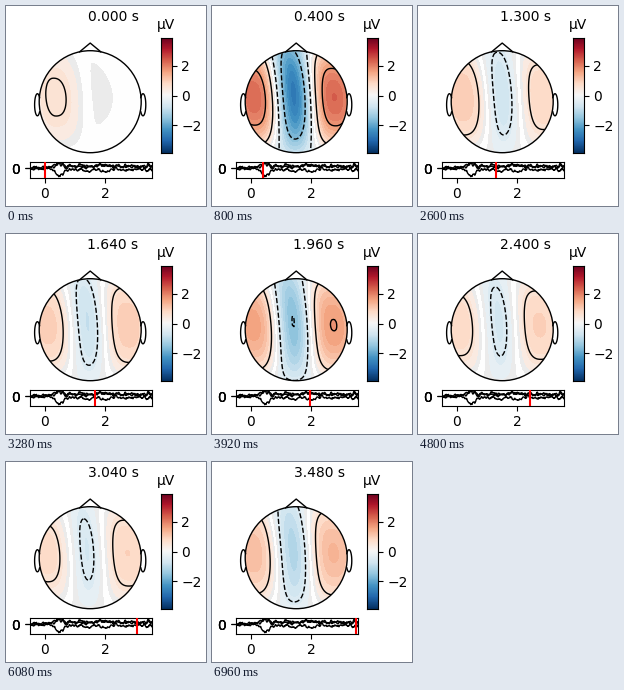
A matplotlib script for the animation above (7 s loop, 200x200 px).

```python
import numpy as np
import matplotlib.pyplot as plt
from matplotlib.animation import FuncAnimation
from matplotlib.patches import Circle

SIZE, FRAMES, STEP = 200, 175, 0.02
CX, CY, R = 84.2, 95.7, 51
VMAX = 3.85

plt.rcParams.update({"font.family": "DejaVu Sans", "font.size": 10})
fig = plt.figure(figsize=(2, 2), dpi=100, facecolor="white")


def axes_px(left, top, right, bottom):
    return fig.add_axes([left / SIZE, 1 - bottom / SIZE,
                         (right - left) / SIZE, (bottom - top) / SIZE])


def bump(t, centre, width, height):
    return height * np.exp(-((t - centre) / width) ** 2)


def potentials(t):
    """Left, centre and right potentials in microvolts."""
    drive = .12 + .55 / (1 + np.exp((.25 - t) / .05))
    drive += bump(t, .47, .14, 2.7) + bump(t, 1.3, .2, .15)
    drive += bump(t, 1.96, .25, .99) + bump(t, 3.5, .2, .5)
    side = 3 * np.tanh((.15 + drive) / 3)
    lateral = bump(t, 0, .25, .8) + bump(t, 1.3, .25, .3) - .1
    return side + lateral / 2, -drive, side - lateral / 2


grid = np.linspace(-1.05, 1.05, 72)
U, V = np.meshgrid(grid, grid)
PX, PY = CX + R * U, CY + R * V


def field(t):
    left, mid, right = potentials(t)
    u0 = -.03 + .2 * (left - right) + .06 * V - .05 * V ** 2
    d = (U - u0) / .8
    a = np.abs(d)
    s = 1 - ((1 + np.cos(np.pi * np.minimum(a, 1))) / 2) ** 1.35
    side = np.where(d < 0, left, right) * (1 - .85 * (V + .09) ** 2)
    side = side * (1 - 2.5 * np.maximum(a - 1, 0) ** 2)
    centre = mid * (1 - .5 * (V + .16) ** 2)
    return centre + (side - centre) * s


# Head map
head = axes_px(0, 0, SIZE, SIZE)
head.set(xlim=(0, SIZE), ylim=(SIZE, 0))
head.axis("off")
skull = head.add_patch(Circle((CX, CY), R, fill=False, lw=1, zorder=5))
dx, dy = np.sin(np.radians(12)), np.cos(np.radians(12))
head.plot(CX + R * np.array([-dx, 0, dx]), CY - R * np.array([dy, 1.15, dy]), "k", lw=1)
angle = np.radians(np.linspace(140, -140, 30))
ear_x = R * (1.035 + .055 * np.cos(angle))
ear_y = CY + R * (.06 - .217 * np.sin(angle))
for sign in (-1, 1):
    head.plot(CX + sign * ear_x, ear_y, "k", lw=1)
clock = head.text(132.5, 15.3, "", ha="right", va="baseline")

# Flat colour bands, nearly white around zero
cmap = plt.get_cmap("RdBu_r")
edges = np.r_[.1, np.arange(.25, 4.4, .2)]
bands = np.r_[-edges[::-1], edges]
middles = (bands[1:] + bands[:-1]) / 2
shades = [cmap(.5 + v / (2 * VMAX)) for v in middles]
zero = len(shades) // 2
shades[zero - 1:zero + 2] = ["#ebebeb", "#fefefe", "#ebebeb"]
lines = np.linspace(-VMAX, VMAX, 7, endpoint=False)[1:]

# Colour bar
bar = axes_px(154.8, 31.8, 165.7, 147.2)
bar.imshow(np.linspace(0, 1, 256)[:, None], cmap=cmap, aspect="auto",
           origin="lower", extent=(0, 1, -VMAX, VMAX))
bar.set_xticks([])
bar.set_yticks([-2, 0, 2], ["\u22122", "0", "2"])
bar.yaxis.tick_right()
bar.set_title("µV", fontsize=10)

# Butterfly plot
trace = axes_px(23.5, 156, 146.2, 171.6)
trace.set(xlim=(-.51, 3.545), ylim=(-4.1, 2.7), xticks=[0, 2])
trace.set_yticks([0, 0, 0], ["0"] * 3)
ts = np.linspace(-.5, 3.53, 300)
rng = np.random.default_rng(4)
for curve in potentials(ts):
    noise = np.convolve(rng.normal(0, .9, ts.size + 4), np.ones(5) / 5, "valid")
    trace.plot(ts, .85 * curve + noise, "k", lw=1)
cursor = trace.axvline(0, color="red", lw=1.5, zorder=4)

drawn = []


def update(i):
    while drawn:
        drawn.pop().remove()
    t = i * STEP
    z = field(t)
    drawn.append(head.contourf(PX, PY, z, levels=bands, colors=shades, zorder=1))
    drawn.append(head.contour(PX, PY, z, levels=lines, colors="k",
                              linewidths=1, zorder=3))
    for item in drawn:
        item.set_clip_path(skull)
    clock.set_text(f"{t:.3f} s")
    cursor.set_xdata([t, t])
    return [*drawn, clock, cursor]


anim = FuncAnimation(fig, update, frames=FRAMES, init_func=lambda: [],
                     interval=40, repeat=True, repeat_delay=0, blit=False)
plt.show()
```
